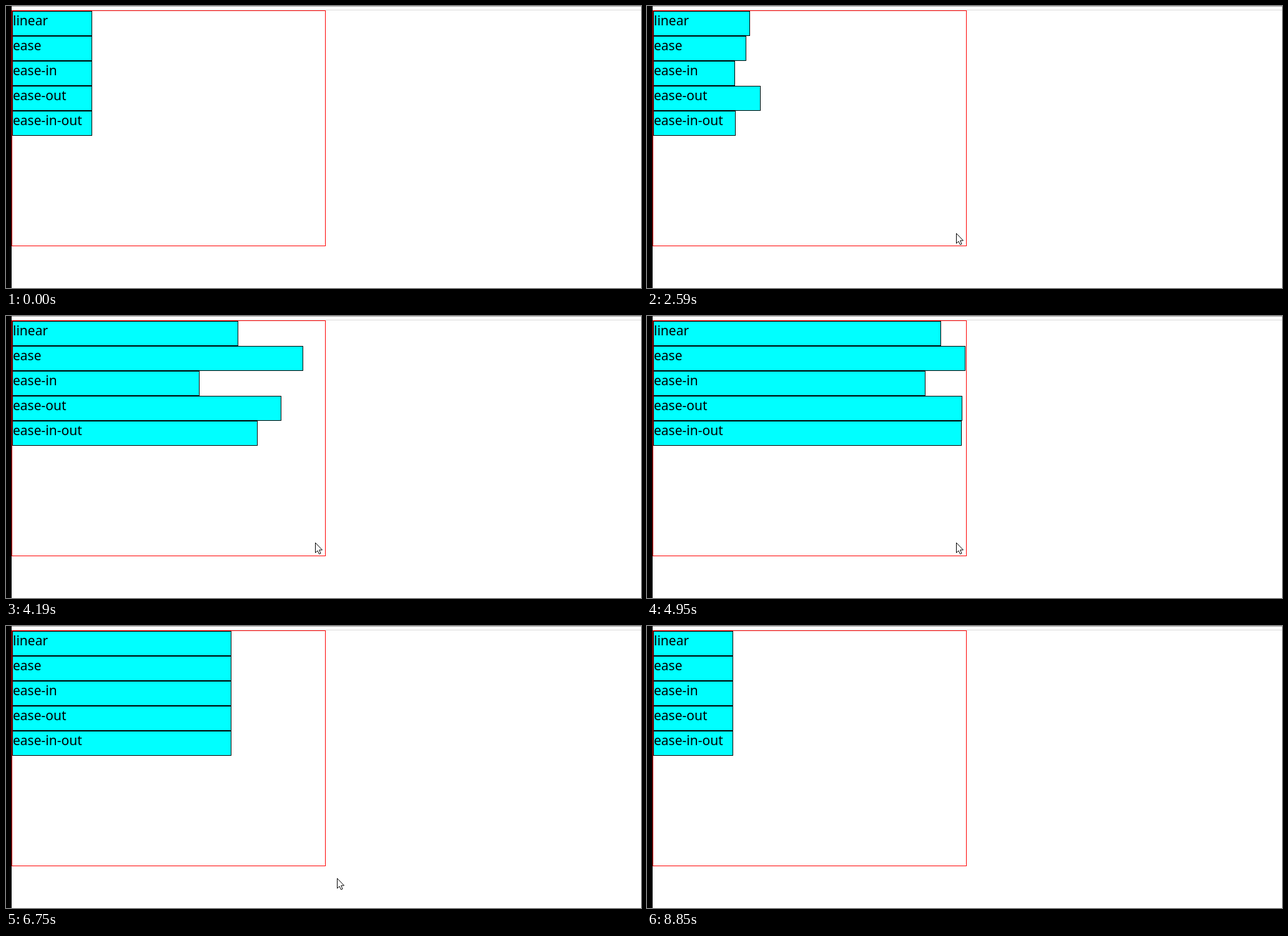
These frames come from a looping animation (1017 by 452 pixels, 9 s). An HTML page with a canvas:

```html
<!DOCTYPE html>
<html lang="en">
<head>
<meta charset="utf-8">
<title>Transition timing functions</title>
<style>
  html, body { margin: 0; width: 100%; height: 100%; overflow: hidden; background: #fff; }
  canvas { display: block; }
</style>
</head>
<body>
<canvas id="stage" width="1017" height="452"></canvas>
<script>
const ctx = document.getElementById('stage').getContext('2d');
const LOOP = 9000;
const GROW = 2382, SHRINK = 6032, DURATION = 2893;
const NARROW = 128, WIDE = 503, ROW = 40;
const ENTER = 1560, LEAVE = 8850;

// A CSS timing curve whose handles end at (x1, y1) and (x2, y2)
function bezier(x1, y1, x2, y2) {
  const at = (a, b, s) => 3 * a * s * (1 - s) ** 2 + 3 * b * s * s * (1 - s) + s ** 3;
  return x => {
    if (x <= 0 || x >= 1) return x <= 0 ? 0 : 1;
    let lo = 0, hi = 1;
    for (let i = 0; i < 30; i++) {
      const mid = (lo + hi) / 2;
      if (at(x1, x2, mid) < x) lo = mid; else hi = mid;
    }
    return at(y1, y2, lo);
  };
}

const ease = bezier(0.25, 0.1, 0.25, 1);
const bars = {
  'linear': bezier(0, 0, 1, 1),
  'ease': ease,
  'ease-in': bezier(0.42, 0, 1, 1),
  'ease-out': bezier(0, 0, 0.58, 1),
  'ease-in-out': bezier(0.42, 0, 0.58, 1)
};

// Where the pointer tip turns or rests
const trail = [
  { t: ENTER, x: 498, y: 442 },
  { t: 2590, x: 495, y: 364 },
  { t: 2710, x: 495, y: 363 },
  { t: 5640, x: 495, y: 363 },
  { t: SHRINK, x: 508, y: 386 },
  { t: 6750, x: 530, y: 404 },
  { t: 7100, x: 555, y: 433 },
  { t: 7710, x: 678, y: 373 },
  { t: 7990, x: 733, y: 376 },
  { t: LEAVE, x: 733, y: 376 }
];
const arrow = new Path2D('M0 0V16L3.5 12.7L6 18L8.5 17L6.2 11.5H11Z');

function fill(color, x, y, w, h) {
  ctx.fillStyle = color;
  ctx.fillRect(x, y, w, h);
}

function frame(color, x, y, w, h) {
  ctx.strokeStyle = color;
  ctx.strokeRect(x + 0.5, y + 0.5, w - 1, h - 1);
}

function drawPage() {
  fill('#fff', 0, 0, 1017, 452);
  fill('#a0a0a0', 9, 0, 1008, 1);
  fill('#dcdcdc', 9, 6, 1008, 1);
  fill('#000', 0, 0, 9, 452);
  frame('#f00', 9, 7, 503, 378);
}

function drawBar(label, curve, i, t) {
  const grown = t < SHRINK
    ? curve((t - GROW) / DURATION)
    : 1 - ease((t - SHRINK) / DURATION);
  const w = Math.round(NARROW + (WIDE - NARROW) * grown);
  const y = 8 + ROW * i;
  fill('#0ff', 10, y, w, ROW);
  frame('#000', 10, y, w, ROW);
  ctx.fillStyle = '#000';
  ctx.font = '21px "Noto Sans", "Open Sans", sans-serif';
  ctx.fillText(label, 11, y + 23);
}

function drawPointer(t) {
  if (t < ENTER || t >= LEAVE) return;
  const i = trail.findIndex(p => p.t > t);
  const a = trail[i - 1], b = trail[i];
  const k = (t - a.t) / (b.t - a.t);
  const along = axis => Math.round(a[axis] + (b[axis] - a[axis]) * k) + 0.5;
  ctx.save();
  ctx.translate(along('x'), along('y'));
  ctx.fillStyle = '#fff';
  ctx.fill(arrow);
  ctx.strokeStyle = '#000';
  ctx.stroke(arrow);
  ctx.restore();
}

const start = performance.now();
ctx.lineJoin = 'miter';

function draw() {
  const t = (performance.now() - start) % LOOP;
  drawPage();
  Object.entries(bars).forEach(([label, curve], i) => drawBar(label, curve, i, t));
  drawPointer(t);
  requestAnimationFrame(draw);
}
draw();
</script>
</body>
</html>
```
